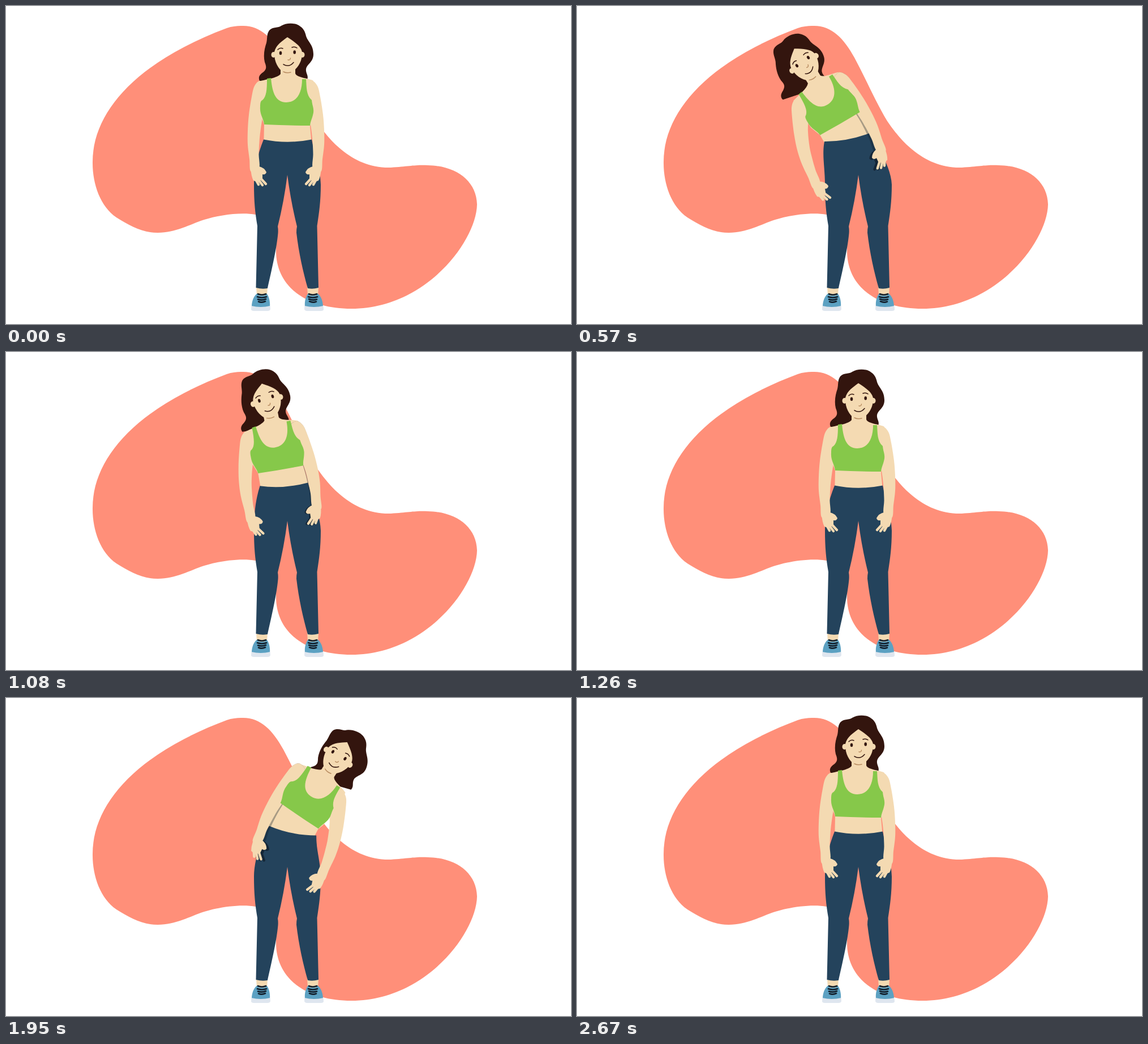
An HTML page for the animation above (2700 ms loop, 998 by 561 pixels).

```html
<!DOCTYPE html>
<html lang="en">
<head>
<meta charset="utf-8">
<title>Side bends</title>
<style>
  html, body { margin: 0; width: 100%; height: 100%; overflow: hidden; background: #fff; }
  svg { display: block; width: 100%; height: 100%; }
  .skin { fill: #f4dab2; color: #f4dab2; }
  .hair { fill: #33150e; }
  .pants { fill: #24435c; }
  .shadow { fill: #0d1824; color: #0d1824; fill-opacity: .5; }
  .line { fill: none; stroke-linecap: round; }
</style>
</head>
<body>
<svg viewBox="0 0 998 561">
  <defs>
    <g id="shoe">
      <path class="skin" d="M442 495H462L461 511H443Z"/>
      <path fill="#5ca1c2" d="M444 507C438 511 434 520 434 531H466C467 520 464 511 460 507L457 511H447Z"/>
      <path fill="#dfe6ef" d="M433.500 529Q450 533 466.500 529L467 535Q466 538 462 538H438Q433 538 433 535Z"/>
      <path class="line" stroke="#131f2b" stroke-width="2.600" d="M445 508Q452 511 459 508M444 513Q452 516 460 513M445 517.500Q452 520 459 517M446 521.500Q452 524 458 521"/>
    </g>
    <g id="hand" fill="currentColor" fill-opacity="1" stroke="none">
      <path d="M432.500 288L447 283Q456 285 460 293Q459 298 453 297L453 304L446 311L437 308Q433 300 432.500 288Z"/>
      <path class="line" stroke="currentColor" stroke-width="4.400" d="M448 302L459 314M444 304L453 316M440 304L446 315"/>
    </g>
    <g id="armL"><path/><use href="#hand"/></g>
    <g id="armR"><path/><use href="#hand"/></g>
  </defs>

  <path fill="#ff8f79" d="M415 35C448 33 471 56 490 91C510 128 527 168 548 203C575 243 617 287 680 285C712 283 722 280 745 281C796 282 831 309 832 350C831 414 742 534 610 534C530 534 476 495 477 430C478 395 470 372 441 368C415 363 375 369 350 377C325 385 300 400 268 400C240 400 218 387 195 373C167 354 153 315 153 277C152 186 232 98 390 39C399 36 407 35 415 35Z"/>

  <g class="torso">
    <path class="hair" id="hair" d="M465 43C472 36 481 39 486 35C494 30 508 29 517 34C525 39 528 44 530 53C533 63 543 68 543 85C543 99 532 102 530 111C529 119 535 122 532 130L490 134L448 132C445 126 448 121 454 117C461 111 460 107 457 99C454 86 457 74 460 65C462 57 460 50 465 43Z"/>
    <path class="skin" d="M485 108H511V119C514 127 535 127 543 132L541 200L537 212L541 256H455L456 209L449 190L447 133C461 129 479 127 485 120Z"/>
  </g>

  <use href="#shoe"/>
  <use href="#shoe" transform="matrix(-1 0 0 1 994 0)"/>
  <path class="pants" id="pants"/>

  <use class="shadow" id="shadeL" href="#armL" opacity=".65"/>
  <use class="shadow" id="shadeR" href="#armR" opacity=".65"/>
  <use class="skin" href="#armL"/>
  <use class="skin" href="#armR"/>

  <g class="torso">
    <path fill="#86c84a" d="M461 128L468 127C470 148 474 170 495 170C516 170 523 150 523 129H530C531 143 530 157 540 166C541 176 544 180 543 188C541 199 538 202 537 211Q496 211 456 209C455 198 448 192 449 178C449 170 450 167 453 166C460 160 461 148 461 128Z"/>
    <g id="face">
      <g class="skin">
        <ellipse cx="472.500" cy="86" rx="4" ry="5"/>
        <ellipse cx="523.500" cy="86" rx="4" ry="5"/>
        <path d="M497 55C488 62 477 68 474 81C473 96 480 112 491 117C497 119 503 118 508 114C518 107 524 93 523 81C521 71 511 64 497 55Z"/>
      </g>
      <g class="hair">
        <ellipse cx="485" cy="83" rx="2.300" ry="3.300"/>
        <ellipse cx="509.700" cy="81.500" rx="2.300" ry="3.300"/>
      </g>
      <g class="line" stroke="#33150e" stroke-width="1.500">
        <path d="M480 77Q484 73 489 75M505 73Q510 71 514 74M490 103Q500 109 508 99.500"/>
        <path stroke="#b98d62" d="M498 95Q502 96 502.500 92M490 116Q496 119 503 117"/>
      </g>
    </g>
  </g>
</svg>
<script>
const LOOP = 2700, LEFT = -32.6, RIGHT = 33.5;
const $ = s => document.querySelector(s);
const torsoParts = document.querySelectorAll('.torso');

const SHOULDER = [448, 145], ELBOW = [438, 220], WRIST = [438, 288];
const UPPER_OUT = [[449, 132], [439, 141], [434, 160], [429, 192]];
const FORE_OUT = [[427, 245], [430, 270], [432.5, 292]];
const FORE_IN = [[447, 286], [446.5, 262], [447.5, 240]];
const UPPER_IN = [[454, 193], [462, 165], [463, 140]];
const ELBOW_OUT = [427, 220], ELBOW_IN = [449.5, 220];

const power = n => u => u < .5 ? (2 * u) ** n / 2 : 1 - (2 - 2 * u) ** n / 2;
const sine = u => (1 - Math.cos(Math.PI * u)) / 2;
const ramp = (t, from, to, ease) => ease(Math.min(1, Math.max(0, (t - from) / (to - from))));

function bend(t) {
  if (t < 1260) return LEFT * (ramp(t, 0, 780, power(4)) - ramp(t, 810, 1295, power(3)));
  return RIGHT * (ramp(t, 1500, 2000, sine) - ramp(t, 2060, 2595, sine));
}

function rotate([x, y], deg, [cx, cy]) {
  const a = deg * Math.PI / 180, c = Math.cos(a), s = Math.sin(a);
  return [cx + (x - cx) * c - (y - cy) * s, cy + (x - cx) * s + (y - cy) * c];
}
const shift = (p, from, to) => [p[0] + to[0] - from[0], p[1] + to[1] - from[1]];
const mix = (a, b) => [(a[0] + b[0]) / 2, (a[1] + b[1]) / 2];
const fmt = p => p.map(v => v.toFixed(2)).join(' ');
const turn = (deg, pivot) => `rotate(${deg} ${fmt(pivot)})`;

// Closed Catmull-Rom curve through the points
function smooth(pts) {
  const n = pts.length, at = i => pts[(i + n) % n];
  const lean = (p, a, b) => [p[0] + (b[0] - a[0]) / 6, p[1] + (b[1] - a[1]) / 6];
  return 'M' + fmt(pts[0]) + pts.map((p, i) => 'C' + [
    lean(p, at(i - 1), at(i + 1)),
    lean(at(i + 1), at(i + 2), p),
    at(i + 1)
  ].map(fmt).join(' ')).join('') + 'Z';
}

function drawArm(side, angle, pivot) {
  const flip = side === 'R';
  const place = p => flip ? [989 - p[0], p[1]] : p;
  const [s0, e0] = [SHOULDER, ELBOW].map(place);
  const size = Math.abs(angle), sign = Math.sign(angle);
  const near = flip ? angle < 0 : angle > 0;
  const upperDeg = sign * (near ? Math.min(.93 * size, 25.5) : .5 * size);
  const foreDeg = sign * (near ? Math.min(.82 * size, 25) : Math.min(.68 * size, 18.5));
  const handDeg = near ? foreDeg : .6 * foreDeg;

  const s = rotate(s0, angle, pivot);
  const upper = p => shift(rotate(place(p), upperDeg, s0), s0, s);
  const e = upper(ELBOW);
  const fore = p => shift(rotate(place(p), foreDeg, e0), e0, e);
  const joint = p => mix(upper(p), fore(p));

  const arm = $('#arm' + side);
  arm.firstChild.setAttribute('d', smooth([
    ...UPPER_OUT.map(upper), joint(ELBOW_OUT), ...FORE_OUT.map(fore),
    ...FORE_IN.map(fore), joint(ELBOW_IN), ...UPPER_IN.map(upper)
  ]));
  arm.lastChild.setAttribute('transform',
    `translate(${fmt(fore(WRIST))}) rotate(${handDeg}) scale(${flip ? -1 : 1} 1) translate(${-WRIST[0]} ${-WRIST[1]})`);

  const lift = near ? Math.min(1, Math.max(0, (size - 7) / 9)) : 0;
  const shade = $('#shade' + side);
  shade.setAttribute('visibility', lift ? 'visible' : 'hidden');
  shade.setAttribute('transform', turn(-sign * 1.9 * lift, s));
}

function drawPants(angle) {
  const pivot = angle < 0 ? [464, 331] : [509, 280];
  const hip = (x, y) => fmt(rotate([x, y], .35 * angle, pivot));
  $('#pants').setAttribute('d',
    `M${hip(455, 235.5)}Q${hip(497, 244)} ${hip(540, 235.5)}` +
    `C${hip(545, 262)} 555 285 556 315` +
    'C556 345 553 365 549.5 388L552 497Q542 500 533 498C525 470 517 435 513 400Q513 393 514 389' +
    'Q503 345 497 298Q491 345 480 389Q481 394 480.500 401C478 430 467 475 462 498Q452 500 441.500 497L444 388' +
    `C440 365 438 345 438 315C438 285 ${hip(446, 258)} ${hip(455, 235.5)}Z`);
}

// The head leans a little ahead of the torso; the hair hangs back towards vertical
function drawHead(angle) {
  const lean = turn(4 * Math.sin(Math.PI * angle / RIGHT), [498, 118]);
  $('#face').setAttribute('transform', lean);
  $('#hair').setAttribute('transform', `${lean} ${turn(-.35 * angle, [499, 44])}`);
}

function draw(t) {
  const angle = bend(t);
  const pivot = angle < 0 ? [476, 266] : [511, 246];
  torsoParts.forEach(g => g.setAttribute('transform', turn(angle, pivot)));
  drawHead(angle);
  drawPants(angle);
  drawArm('L', angle, pivot);
  drawArm('R', angle, pivot);
}

const start = performance.now();
function tick() {
  draw((performance.now() - start) % LOOP);
  requestAnimationFrame(tick);
}
tick();
</script>
</body>
</html>
```
